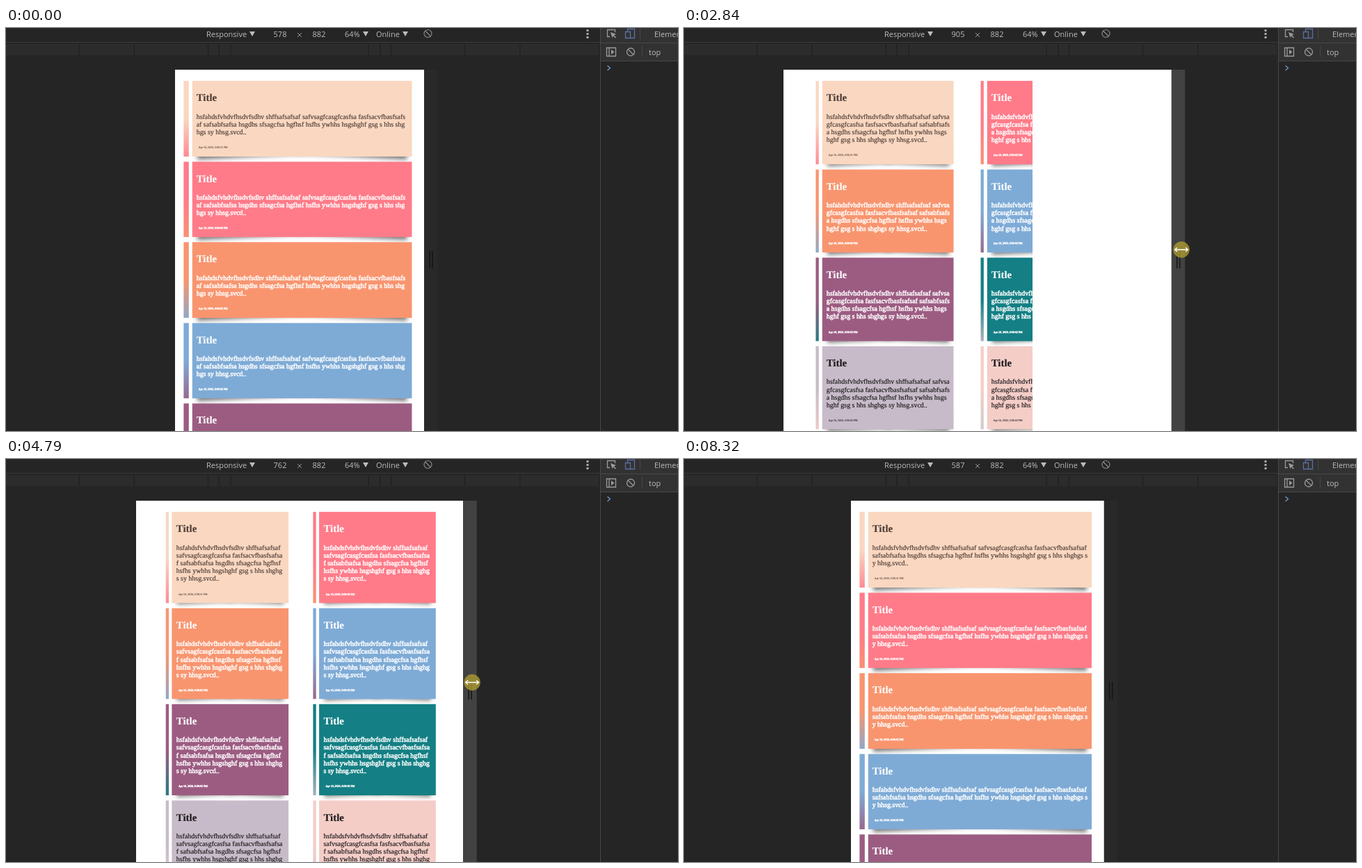
These frames come from a looping animation (966 by 580 pixels, 9.79 s). An HTML page:

```html
<!DOCTYPE html>
<html lang="en">
<head>
<meta charset="utf-8">
<title>Responsive cards</title>
<style>
html, body { margin: 0; width: 100%; height: 100%; overflow: hidden; background: #252525; }
svg { position: absolute; left: 0; top: 0; font: 11px "Open Sans", "Noto Sans", sans-serif; fill: #bcbcbc; }
#device { position: absolute; top: 60px; height: 520px; background: #fff; overflow: hidden; }
#view { height: 100%; overflow: hidden; position: relative; }
#grid {
  position: absolute; display: grid; align-items: start; padding-top: 26px; row-gap: 11.9px;
  transform: scale(.619); transform-origin: 0 0;
  font: 16px/18px "Liberation Serif", serif; text-rendering: geometricPrecision;
}
.card { position: relative; box-sizing: border-box; padding: 7px 8.8px 46.7px 10px; -webkit-text-stroke: .3px; }
.light { color: #fff; -webkit-text-stroke: .8px; }
.card h2 { margin: 20px 0 21px; font-size: 24px; line-height: 27px; -webkit-text-stroke: .2px; }
.card p { margin: 0; word-break: break-all; }
.card small { position: absolute; left: 15px; bottom: 15px; font-size: 6.4px; line-height: 10px; opacity: .75; white-space: nowrap; }
.light small { opacity: 1; }
.card i { position: absolute; top: 0; bottom: 0; left: var(--bar-x); width: var(--bar-w); }
.card::before, .card::after {
  content: ""; position: absolute; z-index: -1; bottom: 15px; left: 10px; width: 50%; height: 20%;
  max-width: 300px; box-shadow: 0 15px 10px #777; transform: rotate(-3deg);
}
.card::after { left: auto; right: 10px; transform: rotate(3deg); }
</style>
</head>
<body>
<div id="device"><div id="view"><div id="grid"></div></div></div>

<svg width="966" height="580">
  <!-- device toolbar -->
  <path d="M0 20.5H854" stroke="#3b3b3b"/>
  <path d="M0 23H852V39H0Z" fill="#2c2c2c"/>
  <path id="ticks" stroke="#222" stroke-width="1.5"/>
  <text x="288" y="12.5">Responsive</text>
  <text id="size" x="394" y="12.5" text-anchor="middle"></text>
  <path d="M419 7l6 6m0-6l-6 6" stroke="#999"/>
  <text x="450" y="12.5" text-anchor="middle">882</text>
  <text x="487" y="12.5">64%</text>
  <text x="532" y="12.5">Online</text>
  <path d="M350 5h8l-4 7zM513 5h8l-4 7zM570 5h8l-4 7z"/>
  <g fill="none" stroke="#8c8c8c" stroke-width="1.2">
    <circle cx="606.5" cy="8" r="5.5"/><path d="M602.5 4l8 8"/>
  </g>
  <path d="M834.5 2h3v3h-3zM834.5 7h3v3h-3zM834.5 12h3v3h-3z" fill="#aaa"/>

  <!-- side panel -->
  <path d="M855 0H966V47H855Z" fill="#323232"/>
  <path d="M854.5 0V580M855 21.5H966M855 47.5H966" stroke="#484848"/>
  <path d="M911.5 1V16M914.5 26V42" stroke="#474747"/>
  <g fill="none" stroke="#9b9b9b" stroke-width="1.3">
    <path d="M868 12.5H864.5V2.5H875.5V6"/>
    <path d="M869 6l8 3-3 1.5 3 3-1.2 1-3-3-1.3 2.5z" fill="#9b9b9b" stroke="none"/>
    <path d="M863.5 28.5H876.5V40.5H863.5ZM867 28V41"/>
    <path d="M870 31l4.5 3.5-4.5 3.5z" fill="#9b9b9b" stroke="none"/>
    <circle cx="898" cy="34.5" r="5.5"/><path d="M894 30.5l8 8"/>
    <path d="M893.5 5V1.5H903.5V14.5H898M890.5 5.5H897.5V14.5H890.5Z" stroke="#5a6fa0"/>
    <path d="M864.5 54l4 3.5-4 3.5" stroke="#6c9cc8"/>
  </g>
  <text x="932" y="12.5">Elements</text>
  <text x="924" y="38.5">top</text>

  <!-- resize handle and pointer -->
  <g id="handle">
    <path id="strip" d="M0 60H19.5V580H0Z"/>
    <path d="M8 321V346M12 321V346" stroke="#161616" stroke-width="1.6"/>
  </g>
  <g id="pointer">
    <circle r="11.7" fill="rgba(180,160,50,.75)"/>
    <path id="resize" d="M-9 0H9M-6 -3L-9.5 0L-6 3M6 -3L9.5 0L6 3" fill="none" stroke="#fff" stroke-width="1.3"/>
    <path id="arrow" d="M0 0V11L2.6 8.6L4.5 12.5L6 11.8L4.3 8H8Z" fill="#fff"/>
  </g>
</svg>

<script>
const LOOP = 9790, SCALE = .619, CENTER = 422;
const START_SIZE = 578, MAX_SIZE = 909, TWO_COLUMNS_FROM = 371;
const TEXT = "hsfahdsfvhdvfhsdvfsdhv shffsafsafsaf safvsagfcasgfcasfsa fasfsacvfbasfsafsaf " +
  "safsabfsafsa hsgdhs sfsagcfsa hgfhsf hsfhs ywhhs hsgshghf gsg s hhs shghgs sy hhsg.svcd..";
const COLORS = ["#fad7c0", "#ff7b89", "#f8956f", "#7eabd6", "#9c5c82", "#147f84", "#c8bbc9", "#f4cdc7", "#ccc"];
const PRESETS = [320, 375, 425, 768, 1024];

const DRAGS = [
  { start: 1990, end: 2920, size: MAX_SIZE, ease: 1.75 },
  { start: 3540, end: 4790, size: 762, ease: 1.15 },
  { start: 4960, end: 6130, size: 587, ease: 1.5 },
];
const APPEAR = 420, GRAB = 1750, RELEASE = 7770, LEAVE = 8320, REPAINT = 3020;

const $ = id => document.getElementById(id);
const mix = (a, b, f) => a + (b - a) * f;
const progress = (t, start, end) => Math.min(1, Math.max(0, (t - start) / (end - start)));

$("ticks").setAttribute("d", PRESETS.flatMap(size => [-1, 1].map(side =>
  `M${CENTER + side * size * SCALE / 2} 23V39`)).join(""));

$("grid").innerHTML = COLORS.slice(0, 8).map((color, i) => {
  const light = i > 0 && i < 6;
  const ink = light ? "" : `color:${i ? "#1c1a1c" : "#4d3c36"};`;
  return `<div class="card ${light ? "light" : ""}" style="${ink}background:${color}">
    <i style="background:linear-gradient(${color} 50%, ${COLORS[i + 1]} 110%)"></i>
    <h2>Title</h2><p>${TEXT}</p><small>Apr 10, 2020, 9:56:${i ? "02" : "11"} PM</small></div>`;
}).join("");

const sizeAt = t => DRAGS.reduce((size, drag) =>
  mix(size, drag.size, 1 - (1 - progress(t, drag.start, drag.end)) ** drag.ease), START_SIZE);
const widthAt = t => 358 + (sizeAt(t) - START_SIZE) * .6103;

// The cards trail the page width, most of all while it first grows.
const lagAt = t => t < DRAGS[0].end ? 236 : 60;

function pointerAt(t) {
  const right = CENTER + widthAt(t + lagAt(t) / 3) / 2;
  const grip = [right + 13, 319 + 12 * ((MAX_SIZE - sizeAt(t)) / 322) ** 2];
  const glide = (from, to, start, end) => from.map((v, i) => mix(v, to[i], progress(t, start, end)));
  let at = glide([628, 492], [512, 390], APPEAR, 570);
  at = glide(at, [644, 326], 1190, 1370);
  at = glide(at, grip, 1520, 1820);
  return glide(at, [880, 592], RELEASE, LEAVE);
}

function layoutCards(width) {
  const two = width >= TWO_COLUMNS_FROM;
  const pitch = .4475 * width;
  const card = two ? .857 * pitch - 13.9 : width - 42.2;
  const left = two ? .155 * pitch + 18.8 : 24.5;
  const px = v => v / SCALE + "px";
  const style = $("grid").style;
  style.gridTemplateColumns = two ? `${px(card)} ${px(card)}` : px(card);
  style.columnGap = px(pitch - card);
  style.paddingLeft = px(left);
  style.setProperty("--bar-x", px(two ? -9 : -12));
  style.setProperty("--bar-w", px(two ? 4.5 : 7));
}

function draw(t) {
  const width = widthAt(t), left = CENTER - width / 2, right = left + width;
  const [x, y] = pointerAt(t);
  const hover = t >= GRAB && t <= RELEASE;

  $("size").textContent = Math.round(sizeAt(t));
  $("device").style.left = left + "px";
  $("device").style.width = width + "px";
  // While the page first grows, only the old area is painted.
  $("view").style.width = t >= DRAGS[0].start && t < REPAINT ? widthAt(0) + "px" : "100%";
  layoutCards(widthAt(t - lagAt(t)));

  $("handle").setAttribute("transform", `translate(${right} 0)`);
  $("strip").setAttribute("fill", hover ? "#424242" : "#292929");
  $("pointer").setAttribute("transform", `translate(${x} ${y})`);
  $("pointer").style.display = t >= APPEAR && t < LEAVE ? "" : "none";
  $("resize").style.display = hover ? "" : "none";
  $("arrow").style.display = !hover && x > right ? "" : "none";
}

const start = performance.now();
function tick() {
  draw((performance.now() - start) % LOOP);
  requestAnimationFrame(tick);
}
tick();
</script>
</body>
</html>
```
